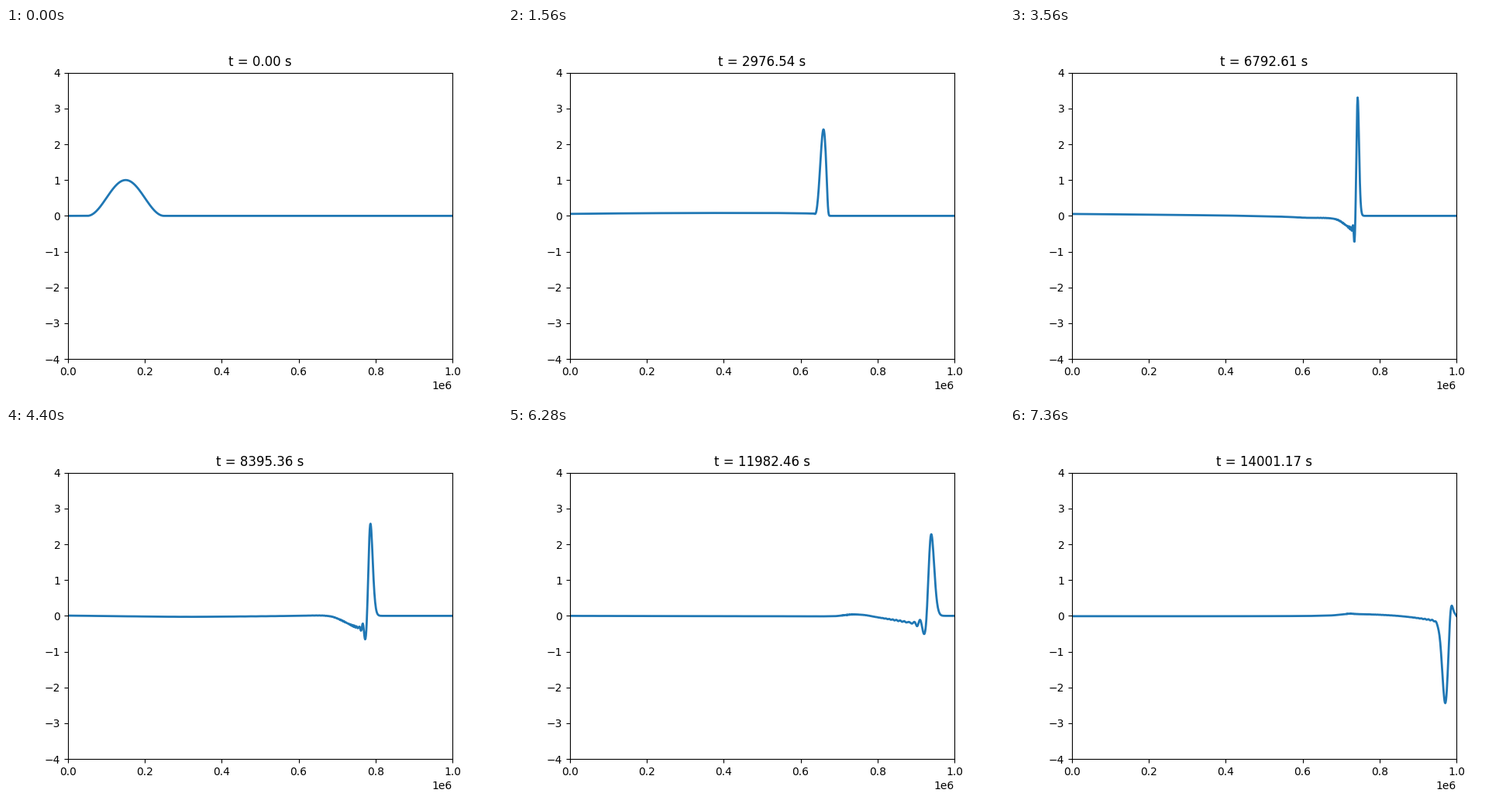
A matplotlib script that plays this animation: 640x480 px, repeating every 7400 ms.

```python
"""Tsunami over a variable sea bed: f_tt = (g h f_x)_x with finite differences."""
import numpy as np
import matplotlib.pyplot as plt
from matplotlib.animation import FuncAnimation

G = 9.81
LENGTH, CELLS = 1.0e6, 1000
H_LEFT, H_REEF, H_RIGHT = 7000.0, 35.0, 200.0
XA, XB, XC, XD = 300e3, 700e3, 720e3, 850e3
X1, X2 = 50e3, 250e3
T_END, STRIDE = 14000.0, 20
INTERVAL = 40


def ramp(x, start, stop, h0, h1):
    s = np.clip((x - start) / (stop - start), 0, 1)
    return h0 + (h1 - h0) * (1 - np.cos(np.pi * s)) / 2


def depth(x):
    return np.where(x < XB, ramp(x, XA, XB, H_LEFT, H_REEF),
                    ramp(x, XC, XD, H_REEF, H_RIGHT))


def pulse(x):
    bump = (1 - np.cos(2 * np.pi * (x - X1) / (X2 - X1))) / 2
    return np.where((x > X1) & (x < X2), bump, 0.0)


def simulate():
    """Return x and the stored (time, height) snapshots."""
    x = np.linspace(0, LENGTH, CELLS + 1)
    dx = x[1] - x[0]
    u2 = G * depth(x)
    u = np.sqrt(u2)
    dt = dx / u.max()
    steps = int(np.ceil(T_END / dt))

    b2 = u2 * (dt / dx) ** 2
    slope = (b2[2:] - b2[:-2]) / 4
    east, west = b2[1:-1] + slope, b2[1:-1] - slope

    now, past = pulse(x), pulse(x + u * dt)
    shots = [(0.0, now)]
    for n in range(1, steps + 1):
        new = np.zeros_like(now)  # right end stays at rest
        new[1:-1] = (2 * now[1:-1] - past[1:-1]
                     + east * (now[2:] - now[1:-1])
                     - west * (now[1:-1] - now[:-2]))
        new[0] = now[0] + np.sqrt(b2[0]) * (now[1] - now[0])  # open left end
        past, now = now, new
        if n % STRIDE == 0 or n == steps:
            shots.append((n * dt, now))
    return x, shots


x, shots = simulate()

fig, ax = plt.subplots(figsize=(6.4, 4.8), dpi=100)
line, = ax.plot(x, shots[0][1], linewidth=2)
title = ax.set_title("t = 0.00 s")
ax.set_xlim(0, LENGTH)
ax.set_ylim(-4, 4)


def update(i):
    t, f = shots[i]
    line.set_ydata(f)
    title.set_text(f"t = {t:.2f} s")
    return line, title


anim = FuncAnimation(fig, update, frames=len(shots), interval=INTERVAL,
                     repeat=True, repeat_delay=0, blit=False)
plt.show()
```
